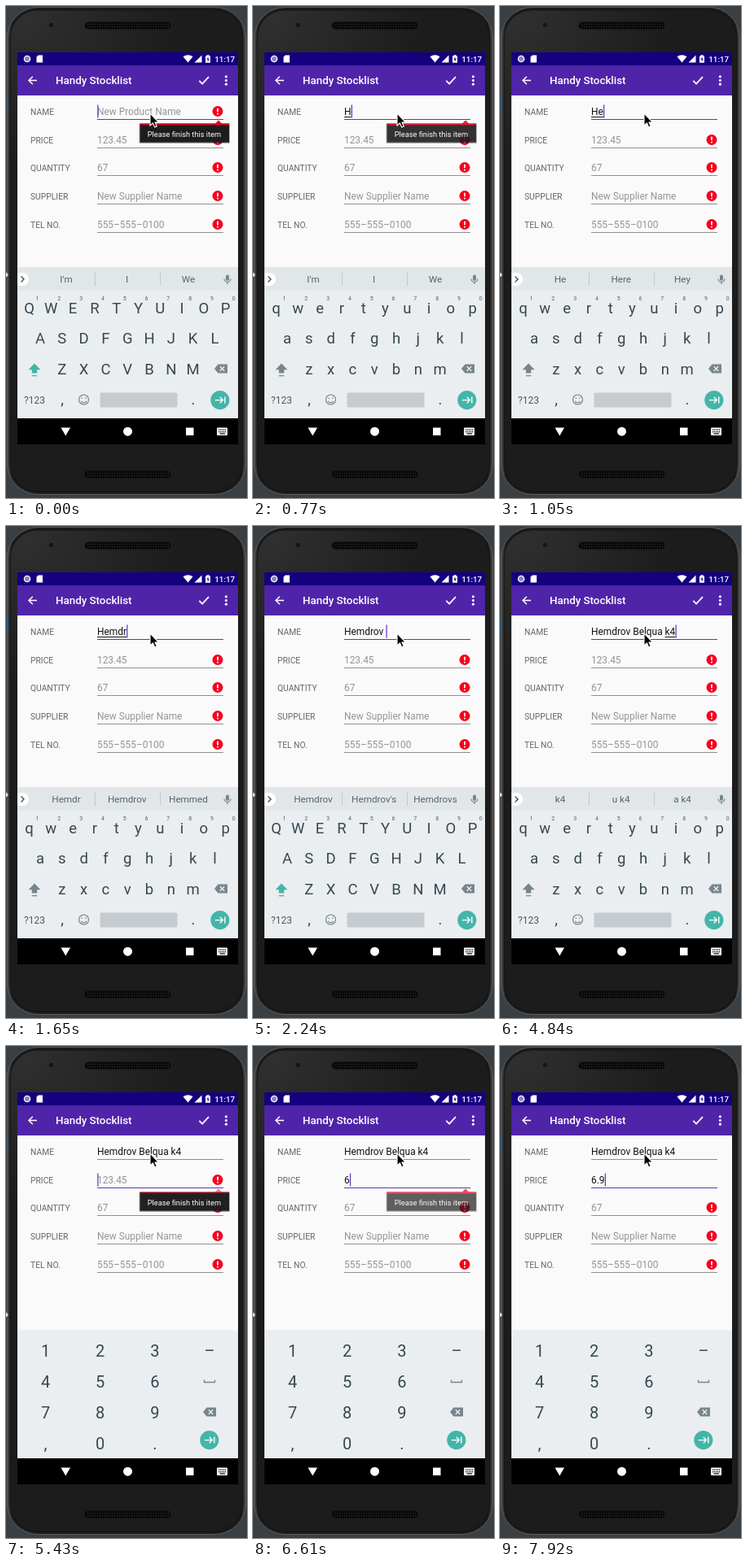
These frames come from a looping animation (296x605 px, 8 s). An HTML page:

```html
<!DOCTYPE html>
<html lang="en">
<head>
<meta charset="utf-8">
<title>Inventory form</title>
<style>
  html, body { margin: 0; width: 100%; height: 100%; overflow: hidden; background: #3a3f43; }
  svg { display: block; width: 296px; height: 605px; }
  text { font-family: Roboto, Arial, sans-serif; white-space: pre; }
  .mid { text-anchor: middle; }
  .label { font-size: 10.3px; fill: #666; }
  .field { font-size: 11.9px; fill: #111; }
  .field.hint { fill: #959595; }
  .word { font-size: 11.7px; fill: #57646b; }
  .key { font-size: 18.5px; fill: #37474f; }
  .digit { font-size: 20px; fill: #37474f; }
  .small { font-size: 7px; fill: #546068; }
  .rule { stroke: #8f8f8f; stroke-width: 1; }
  .rule.focus { stroke: #5f35b5; }
  .caps .letter { text-transform: uppercase; }
  .shift { fill: #78858c; }
  .caps .shift { fill: #45b5a9; }
  .pad #letters, svg:not(.pad) #numbers { display: none; }
</style>
</head>
<body>
<svg id="stage" viewBox="0 0 296 605" xmlns="http://www.w3.org/2000/svg">
  <defs>
    <linearGradient id="shell" x2="1" y2="0">
      <stop offset="0" stop-color="#484848"/><stop offset=".02" stop-color="#1c1c1c"/>
      <stop offset=".98" stop-color="#1c1c1c"/><stop offset="1" stop-color="#484848"/>
    </linearGradient>
    <radialGradient id="gloss" gradientUnits="userSpaceOnUse" cx="20" cy="10" r="190">
      <stop offset="0" stop-color="#303030"/><stop offset="1" stop-color="#1c1c1c"/>
    </radialGradient>
    <pattern id="mesh" width="3" height="3" patternUnits="userSpaceOnUse">
      <rect width="3" height="3" fill="#080808"/><circle cx="1.5" cy="1.5" r=".7" fill="#303030"/>
    </pattern>
    <g id="alert">
      <circle r="6.5" fill="#f5001d"/>
      <path d="M0-3.8V.8M0 2.2V3.9" stroke="#fff" stroke-width="1.7"/>
    </g>
    <g id="erase">
      <path d="M-8 0L-3.5-5.5H8V5.5H-3.5Z" fill="#78858c"/>
      <path d="M-1.2-2.7L4.2 2.7M4.2-2.7L-1.2 2.7" stroke="#eceff1" stroke-width="1.4"/>
    </g>
    <g id="next">
      <circle r="11.6" fill="#45b5a9"/>
      <path d="M-6 0H3.5M0-3.6L3.6 0L0 3.6M6-4V4" fill="none" stroke="#fff" stroke-width="1.4"/>
    </g>
  </defs>

  <!-- Phone -->
  <rect width="296" height="605" fill="#3a3f43"/>
  <rect y="113" width="2" height="18" fill="#164a72"/>
  <rect x="1.5" y="1.5" width="293" height="599" rx="38" fill="url(#shell)" stroke="#5c5c5c"/>
  <rect x="5" y="5" width="286" height="592" rx="34" fill="url(#gloss)" stroke="#121212"/>
  <circle cy="330.5" r="2.5" fill="#ddd"/>
  <circle cx="55.5" cy="23.5" r="3.5" fill="#151515" stroke="#333"/>
  <g fill="url(#mesh)" stroke="#0b0b0b">
    <rect x="97" y="20" width="105" height="8" rx="4"/>
    <rect x="97" y="572" width="105" height="8" rx="4"/>
  </g>

  <!-- Status and title bars -->
  <rect x="14" y="57" width="271" height="482" fill="#fafafa"/>
  <rect x="14" y="57" width="271" height="16" fill="#150080"/>
  <rect x="14" y="73" width="271" height="37" fill="#5024a9"/>
  <g fill="#fff">
    <circle cx="26" cy="65" r="3.6" fill="#8a83c0" stroke="#fff" stroke-width="1.3"/>
    <path d="M39.5 60.5H45V69.5H37.5V62.8Z"/>
    <path d="M217.5 62.2Q223.5 58.5 229.5 62.2L223.5 69.5Z"/>
    <path d="M240.5 60.5V69.5H231.5Z"/>
    <path d="M245 61.5H246.5V60.2H249.5V61.5H251V69.8H245Z"/>
    <path d="M248.4 62.5L246.5 65.8H247.8V68.5L249.7 65H248.4Z" fill="#150080"/>
    <text x="256.3" y="68.7" font-size="9.8" font-weight="500">11:17</text>
    <text x="61" y="96.3" font-size="13.35" font-weight="500">Handy Stocklist</text>
    <circle cx="270.4" cy="86.8" r="1.6"/><circle cx="270.4" cy="91.5" r="1.6"/><circle cx="270.4" cy="96.2" r="1.6"/>
  </g>
  <g fill="none" stroke="#fff">
    <path d="M38 91.5H28.5M32.8 86.8L28 91.5L32.8 96.2" stroke-width="1.5"/>
    <path d="M237.3 91.8L241.1 95.6L249 87.2" stroke-width="1.8"/>
  </g>

  <g id="form"></g>
  <path id="compose" stroke="#111" stroke-width="1"/>
  <rect id="caret" width="1.3" height="16" fill="#6a3bd0"/>

  <g id="tip">
    <rect x="163.5" y="144" width="111.5" height="25" rx="1.5" opacity=".35"/>
    <rect x="164.5" y="145" width="109.5" height="22.7" fill="#1d1d1d"/>
    <g id="tipEdge" fill="#ee001c"><rect x="164.5" y="144.5" width="109.5" height="1.8"/><path d="M256.5 145L261 140.5L265.5 145Z"/></g>
    <text x="173.7" y="160.5" font-size="9.25" fill="#fff">Please finish this item</text>
  </g>

  <!-- Keyboards -->
  <g id="letters">
    <rect x="14" y="321" width="271" height="187" fill="#eaeef1"/>
    <rect x="14" y="321" width="271" height="28.5" fill="#e1e6e8"/>
    <path d="M14 328H20A8 8 0 0 1 20 344H14Z" fill="#fff"/>
    <path d="M18.5 332.5L22 336L18.5 339.5" fill="none" stroke="#444" stroke-width="1.3"/>
    <path id="split" stroke="#c3c9cc"/>
    <rect x="270" y="330.5" width="4" height="7.5" rx="2" fill="#78858c"/>
    <path d="M268 335.5A4 4 0 0 0 276 335.5M272 339.5V342" fill="none" stroke="#78858c" stroke-width="1.2"/>
    <g class="shift"><path d="M35 439.5L42.4 447.2H38.2V451.5H31.8V447.2H27.6Z"/><rect x="31.8" y="454" width="6.4" height="1.3"/></g>
    <use href="#erase" x="264" y="446"/>
    <text class="mid" x="35" y="488.5" font-size="12" fill="#4a5960">?123</text>
    <text class="mid key" x="69" y="490">,</text>
    <g fill="none" stroke="#78858c" stroke-width="1.2">
      <circle cx="95.5" cy="484" r="6"/><path d="M92.2 485.8Q95.5 490 98.8 485.8M93.3 481.5V483M97.7 481.5V483"/>
    </g>
    <rect x="115.5" y="475.5" width="95" height="18" rx="1.5" fill="#c6cbcf"/>
    <text class="mid key" x="230" y="490">.</text>
    <use href="#next" x="262.8" y="484.6"/>
  </g>
  <g id="numbers">
    <rect x="14" y="349.5" width="271" height="158.5" fill="#eaeef1"/>
    <path d="M243.5 410.5V413.5H256.5V410.5" fill="none" stroke="#78858c" stroke-width="1.3"/>
    <use href="#erase" x="250" y="450"/>
    <use href="#next" x="249.8" y="484.6"/>
  </g>

  <!-- Navigation bar -->
  <rect x="14" y="507" width="271" height="32" fill="#000"/>
  <g fill="#fff">
    <path d="M67.5 518.5H79L73.25 528.5Z"/><circle cx="149.5" cy="523.2" r="5.5"/>
    <rect x="221" y="518.5" width="9.5" height="9.5"/><rect x="259" y="518.5" width="13" height="9.5" rx="1"/>
  </g>
  <path d="M261 521.2H270.5M261 523.6H270.5" stroke="#000" stroke-width="1.2" stroke-dasharray="1.3 .7"/>
  <path d="M262.5 526H269" stroke="#000" stroke-width="1.2"/>

  <path d="M177 132V147L180.4 143.9L182.7 149L185.2 147.9L183 143H187.5Z" fill="#000" stroke="#fff" stroke-width="1.1"/>
</svg>
<script>
const LOOP = 8000, LEFT = 112, ROW = 34.7;
const $ = id => document.getElementById(id);
const stage = $("stage");

function add(parent, tag, attrs, text = "") {
  const node = document.createElementNS("http://www.w3.org/2000/svg", tag);
  for (const key in attrs) node.setAttribute(key, attrs[key]);
  node.textContent = text;
  return parent.appendChild(node);
}

const rows = [
  ["NAME", "New Product Name"], ["PRICE", "123.45"], ["QUANTITY", "67"],
  ["SUPPLIER", "New Supplier Name"], ["TEL NO.", "555–555–0100"]
].map(([label, hint], i) => {
  const y = 130 + Math.round(i * ROW), form = $("form");
  add(form, "text", { class: "label", x: 30, y: y + 4 }, label);
  return {
    hint,
    value: add(form, "text", { x: LEFT, y: y + 4.2 }),
    rule: add(form, "path", { d: `M${LEFT} ${y + 9.5}H267` }),
    alert: add(form, "use", { href: "#alert", x: 260, y: y - .5 })
  };
});

["qwertyuiop", "asdfghjkl", "zxcvbnm"].forEach((keys, r) => {
  [...keys].forEach((key, i) => {
    const x = [28.5, 42, 68.8][r] + i * 26.8;
    add($("letters"), "text", { class: "mid key letter", x, y: 377.5 + r * 37.9 }, key);
    if (r === 0) add($("letters"), "text", { class: "mid small", x: x + 10, y: 361.8 }, (i + 1) % 10);
  });
});
["123–", "456 ", "789 ", ",0. "].forEach((keys, r) => [...keys].forEach((key, i) =>
  add($("numbers"), "text", { class: "mid digit", x: 48.5 + i * 67.2, y: 381.5 + r * 38 }, key)));

const words = [74, 148.7, 224].map(x => add($("letters"), "text", { class: "mid word", x, y: 340.2 }));

const pen = document.createElement("canvas").getContext("2d");
function width(text) {
  pen.font = "11.9px Roboto, Arial, sans-serif";
  return pen.measureText(text).width;
}

// Each step changes part of the state and the rest carries over.
const type = (name, words, more) => ({ name, words, caret: true, caps: false, compose: true, ...more });
const price = (text, more) => ({ price: text, caret: true, ...more });
const blink = caret => ({ caret });
const A = "Hemdrov", B = "Hemdrov Belqua";
const steps = [
  [0, { name: "", price: "", focus: 0, caret: true, caps: true, compose: false, pad: false, tip: 1, edge: 1, words: "I'm|I|We" }],
  [110, blink(false)],
  [590, blink(true)],
  [770, type("H", "I'm|I|We", { tip: .9 })],
  [830, { words: "H|He|Have", tip: .6 }],
  [890, { tip: .3 }],
  [950, { tip: 0 }],
  [1000, type("He", "H|He|Have")],
  [1050, { words: "He|Here|Hey" }],
  [1230, type("Hem", "Hem|Hemp|Them")],
  [1470, type("Hemd", "Hemd|Hemmed|Hemdrov")],
  [1650, type("Hemdr", "Hemdr|Hemdrov|Hemmed")],
  [1730, type("Hemdro", "Hemdro|Hemdrov|Hemdrovs")],
  [1820, type(A, "Hemdrov|Hemdrov's|Hemdrovs")],
  [2240, { name: A + " ", caps: true, compose: false }],
  [2300, { words: "Belqua|and|is" }],
  [2590, type(A + " B", "B|But|By")],
  [2770, type(A + " Be", "Be|Been|Bed")],
  [2950, type(A + " Bel", "Bel|Bell|Below")],
  [3070, type(A + " Belq", "Belq|Belqua|Bell")],
  [3190, type(A + " Belqu", "Belqu|Belqua|Bell")],
  [3420, type(B, "|Belqua|")],
  [3720, { name: B + " ", caps: true, compose: false, words: "and|is|in" }],
  [4020, type(B + " k", "k|ok|kk")],
  [4490, blink(false)],
  [4840, type(B + " k4", "k4|u k4|a k4")],
  [5260, { focus: 1, compose: false, pad: true, tip: .25, edge: .5 }],
  [5320, { tip: .55 }],
  [5380, { tip: .8 }],
  [5430, { tip: .98 }],
  [5540, { tip: 1, edge: 1 }],
  [5780, blink(false)],
  [6250, blink(true)],
  [6610, price("6", { tip: .7 })],
  [6700, { tip: .35 }],
  [6790, price("6.", { tip: 0 })],
  [7270, blink(false)],
  [7510, price("6.9")],
  [7690, price("6.99")],
  [7920, price("6.9")]
];
let carried = {};
const states = steps.map(([time, change]) => ({ time, ...(carried = { ...carried, ...change }) }));

function draw(s) {
  const typed = [s.name, s.price, "", "", ""];
  rows.forEach((row, i) => {
    row.value.textContent = typed[i] || row.hint;
    row.value.setAttribute("class", typed[i] ? "field" : "field hint");
    row.rule.setAttribute("class", i === s.focus ? "rule focus" : "rule");
    row.alert.style.display = typed[i] ? "none" : "";
  });
  const end = LEFT + width(typed[s.focus]);
  const start = LEFT + width(s.name.slice(0, s.name.lastIndexOf(" ") + 1));
  $("caret").setAttribute("x", end + .2);
  $("caret").setAttribute("y", 121.5 + s.focus * 35);
  $("caret").style.display = s.caret ? "" : "none";
  $("compose").setAttribute("d", s.compose ? `M${start} 136.5H${end}` : "");
  $("tip").setAttribute("transform", `translate(0 ${s.focus * 35})`);
  $("tip").setAttribute("opacity", s.tip);
  $("tipEdge").setAttribute("opacity", s.edge);
  const list = s.words.split("|");
  words.forEach((node, i) => node.textContent = list[i]);
  $("split").setAttribute("d", list[0] ? "M109.5 328V344M189.5 328V344" : "M259.5 328V344");
  stage.classList.toggle("caps", s.caps);
  stage.classList.toggle("pad", s.pad);
}

let shown;
function tick() {
  const time = performance.now() % LOOP;
  const state = states.findLast(s => s.time <= time);
  if (state !== shown) draw(shown = state);
  requestAnimationFrame(tick);
}
tick();
</script>
</body>
</html>
```
